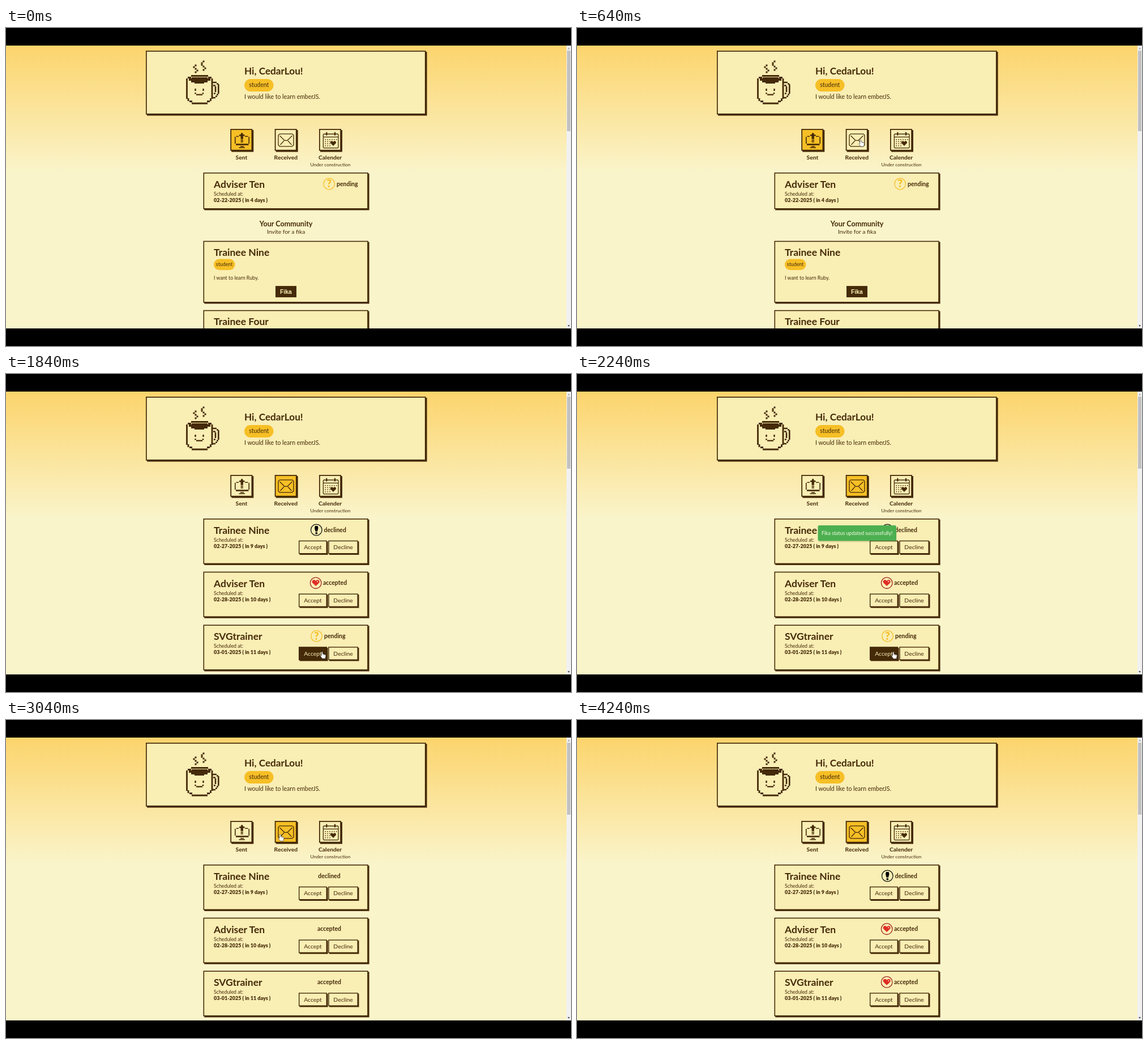
An HTML page that plays this animation: 998x561 px, repeating every 4320 ms.

```html
<!DOCTYPE html>
<html lang="en">
<head>
<meta charset="utf-8">
<title>Fika dashboard</title>
<style>
html, body { margin: 0; width: 100%; height: 100%; overflow: hidden; background: #000; }
svg { display: block; width: 998px; height: 561px; }
text { font-family: Lato, "Open Sans", sans-serif; fill: #452a08; white-space: pre; }
.b { font-weight: 700; }
.x { font-weight: 900; }
.m { text-anchor: middle; }
.fika { font-family: "Liberation Sans", Arial, sans-serif; font-weight: 700; fill: #f9eeb4; }
</style>
</head>
<body>
<svg id="stage" viewBox="0 0 998 561"></svg>
<script>
const INK = '#452a08', CARD = '#f9eeb4', GOLD = '#f6bf26';
const LOOP = 4320, STEP = 80;

const rect = (x, y, w, h, fill, extra = '') =>
  `<rect x="${x}" y="${y}" width="${w}" height="${h}" fill="${fill}" ${extra}/>`;
const text = (x, y, size, str, cls = '', extra = '') =>
  `<text x="${x}" y="${y}" font-size="${size}" class="${cls}" ${extra}>${str}</text>`;
const line = (d, width, extra = '') =>
  `<path d="${d}" fill="none" stroke="${INK}" stroke-width="${width}" ${extra}/>`;
const group = (id, inner, extra = '') => `<g id="${id}" ${extra}>${inner}</g>`;
const at = (x, y, inner) => `<g transform="translate(${x} ${y})">${inner}</g>`;

// Bordered panel with a hard offset shadow
const panel = (x, y, w, h, fill = CARD, edge = 1.6, drop = 1.8, id = '') =>
  rect(x + drop, y + drop, w, h, INK) +
  rect(x + edge / 2, y + edge / 2, w - edge, h - edge, fill,
    `stroke="${INK}" stroke-width="${edge}" ${id && `id="${id}"`}`);

const cup = () => {
  const steam = [[349, 59], [346, 62], [346, 65], [349, 68], [352, 71], [349, 74],
    [335, 66], [332, 69], [335, 72], [338, 75], [335, 78]];
  return steam.map(([x, y]) => rect(x - 1.5, y - 1.5, 3, 3, INK)).join('') +
    line('M327 84.5H357M321 87.5H327M357 87.5H363M319.5 89V125M364 89V125' +
      'M322 124V129M361.5 124V129M324 129.5H329M355 129.5H360M328 133H356', 2.8) +
    `<path d="M323 89H328V87H356V89H361V93H356V96H350V98H333V96H327V93H323Z" fill="${INK}"/>` +
    line('M364 96H372M372 98.5H375M375.3 99V116M372 117.5H375M370 120.5H373M364 123H370' +
      'M366 101.5H370M370 103V113M367 115.5H370', 2.6) +
    line('M334.5 107V111M348.5 107V111M334.5 114V116.5M348 114V116.5M336 117.6H347', 2.4);
};

const heart = (x, y, u, fill) =>
  `<path transform="translate(${x} ${y}) scale(${u})" fill="${fill}" d="M-5-2V-4H-4V-5H-1V-4H1V-5H4V-4H5V-1H4V0H3V1H2V2H1V3H-1V2H-2V1H-3V0H-4V-1H-5Z"/>`;

const monitor = () =>
  line('M411 191.2H406.5M404.8 192V204M422 191.2H427.5M429.2 192V204', 1.6) +
  rect(406, 204.2, 22.5, 2.6, INK) +
  line('M414 209H420M411.5 211H422', 1.7) +
  `<path fill="${INK}" d="M416.7 184.5L418.7 186.5V188H421.5V190.5H418.9V196H414.6V190.5H412V188H414.7V186.5Z"/>` +
  rect(414.6, 197, 4.3, 1.8, INK) + rect(414.6, 199.8, 4.3, 1.8, INK);

const envelope = () =>
  line('M483.5 186.8H505.5L508 189V206.5L505.5 208.8H483.5L481 206.5V189Z', 1.3) +
  line('M483.5 190L492 198.3H497L505.5 190M484.5 206L491 199M504.5 206L498 199', 1.2);

const calendar = () => {
  let dots = '';
  for (let r = 0; r < 4; r++)
    for (let c = 0; c < 6; c++)
      if (r < 1 || c < 3) dots += rect(563.5 + c * 3.9, 196 + r * 3.7, 1.5, 1.5, INK);
  return line('M561.5 187H586L587 188V210.5L586 211.7H561.5L560.4 210.5V188ZM560 192.3H587', 1.3) +
    line('M566.3 183.8V189.5M581 183.8V189.5', 2.2) + dots + heart(578, 204.5, .98, INK);
};

const ring = (color, inner) =>
  `<circle r="9.8" fill="none" stroke="${color}" stroke-width="1.3"/>` + inner;
const marks = {
  pending: ring(GOLD, text(0, 6.2, 18, '?', 'x m', `style="fill:${GOLD}"`)),
  accepted: ring('#9f2822', heart(0, 1, 1.28, '#df2c24') + rect(2, -3.5, 2, 2, '#f6c9ae')),
  declined: ring('#111', `<path d="M-2-7H2L3-5V-2L1.5 3H-1.5L-3-2V-5Z"/>` + rect(-1.7, 4.2, 3.4, 3.2, '#000'))
};

const tab = (x, id, label, icon) =>
  panel(x, 178, 39, 38.6, CARD, 1.8, 2, id) + icon() + text(x + 19.6, 231.6, 10.3, label, 'b m');

const button = (x, y, w, label, id = '') =>
  panel(x, y, w, 23.6, CARD, 1.4, 1.6, id) +
  text(x + w / 2, y + 15.5, 10.4, label, 'm', id && `id="${id}Text"`);

const meeting = (y, h, name, date) =>
  panel(348.5, y, 291.3, h) + text(367, y + 27, 17.5, name, 'b') +
  text(367, y + 40.8, 8.8, 'Scheduled at:') + text(367, y + 52, 9, date, 'x');

// Status label sits in the middle until its mark has loaded
const status = (y, kind, cx, tx) =>
  `<g class="loaded">${at(cx, y + 20, marks[kind])}${text(tx, y + 23.6, 10.5, kind, 'b')}</g>` +
  `<g class="loading">${text(571, y + 23.6, 10.5, kind, 'b m')}</g>`;

const invite = (y, name, date, state, id) =>
  meeting(y, 80.3, name, date) + state +
  button(517, y + 38.8, 50, 'Accept', id) + button(569.3, y + 38.8, 52.6, 'Decline');

const member = (y, name, bio) =>
  panel(348.5, y, 291.3, 109) + text(367, y + 26.8, 17.5, name, 'b') +
  rect(367, y + 32, 37.5, 19.4, GOLD, 'rx="9.7"') + text(385.6, y + 44.5, 8.8, 'student', 'm') +
  text(367, y + 68.2, 8.8, bio) + rect(476, y + 79.5, 37, 20, INK) +
  text(494.5, y + 93, 10.4, 'Fika', 'fika m');

const cursors = {
  arrow: '<path d="M0 0V9.2L2.2 7.2L3.7 10.4L5.2 9.7L3.8 6.6H6.7Z" fill="#fff" stroke="#333" stroke-width=".7"/>',
  hand: '<path d="M-1.2.8Q0-.7 1.1.8V4L6 5.2Q6.7 5.6 6.5 7L5.6 12H.2L-2.8 7.8Q-3.2 6.3-1.2 6.8Z" fill="#fff" stroke="#444" stroke-width=".7"/>' +
    '<path d="M2.7 4.5V6.6M4.4 4.9V6.8" stroke="#777" stroke-width=".5"/>',
  beam: '<path d="M-1.7-4.3H1.7M0-4.3V4.3M-1.7 4.3H1.7" stroke="#333" stroke-width=".8" fill="none"/>'
};

document.getElementById('stage').innerHTML =
  `<defs><linearGradient id="sky" x1="0" y1="0" x2="0" y2="1">
    <stop offset="0" stop-color="#fcd46c"/><stop offset="1" stop-color="#faf4ca"/>
  </linearGradient><clipPath id="view">${rect(0, 31, 998, 499, '#000')}</clipPath></defs>
  <g clip-path="url(#view)">` +
  rect(0, 31, 998, 499, '#faf4ca') + rect(0, 31, 998, 222, 'url(#sky)') +
  panel(247, 40, 494.6, 112.6, CARD, 1.7, 2) + cup() +
  text(421, 82, 17.2, 'Hi, CedarLou!', 'b') +
  rect(421, 90, 51.5, 22, GOLD, 'rx="11"') + text(446.7, 104.4, 10.5, 'student', 'm') +
  text(421, 124.6, 10.5, 'I would like to learn emberJS.') +
  tab(396.3, 'sentTab', 'Sent', monitor) +
  tab(474.7, 'receivedTab', 'Received', envelope) +
  tab(553, 'calendarTab', 'Calender', calendar) +
  text(573, 243.6, 8.4, 'Under construction', 'm') +
  group('sent', meeting(255, 64.6, 'Adviser Ten', '02-22-2025 ( in 4 days )') +
    at(570.7, 275, marks.pending) + text(584, 278.7, 10.5, 'pending', 'b')) +
  group('community', text(494.6, 276.3, 12.6, 'Your Community', 'b m') +
    text(494.6, 290.1, 10.3, 'Invite for a fika', 'm') +
    member(302.3, 'Trainee Nine', 'I want to learn Ruby.') +
    member(424.4, 'Trainee Four', "I'm studying Javascript. And I have 2 years of experience with Ruby.")) +
  group('received',
    invite(255, 'Trainee Nine', '02-27-2025 ( in 9 days )', status(255, 'declined', 548.3, 561.5)) +
    invite(348.7, 'Adviser Ten', '02-28-2025 ( in 10 days )', status(348.7, 'accepted', 547.2, 560)) +
    invite(442.4, 'SVGtrainer', '03-01-2025 ( in 11 days )',
      group('before', status(442.4, 'pending', 548.6, 562)) +
      group('after', status(442.4, 'accepted', 547.2, 560)), 'pick')) +
  group('toast', rect(426, 268.5, 138.5, 28, '#452a08', 'rx="3" opacity=".14"') +
    rect(425.5, 267, 138.5, 27.6, '#4caf50', 'rx="3"') +
    text(494.7, 284, 8.75, 'Fika status updated successfully!', 'm', 'style="fill:#f6fbe6"')) +
  rect(990, 31, 8, 499, '#f1f1f1') + rect(991, 40, 6, 142, '#c1c1c1', 'id="thumb"') +
  `<path d="M994 34.5L996 37.5H992Z" fill="#a3a3a3"/><path d="M994 527L996 524H992Z" fill="#505050"/>` +
  group('cursor', Object.entries(cursors).map(([k, v]) => group(k, v)).join('')) + '</g>';

// time, list shown, scrollbar thumb height
const views = [[0, 'sent', 142], [720, 'received', 127], [2560, '', 148.5], [3040, 'received', 127]];

// time, x, y, cursor shape
const path = [
  [0, 0, 0, ''], [160, 590, 520, 'arrow'], [400, 526, 270, 'arrow'], [480, 503, 203, 'hand'],
  [560, 501, 197, 'hand'], [720, 501, 197, 'hand'], [800, 510, 235, 'arrow'],
  [1120, 543, 373, 'arrow'], [1280, 543, 373, 'arrow'], [1680, 555, 470, 'arrow'],
  [1760, 558.3, 490, 'hand'], [2560, 559, 490.5, 'beam'], [2800, 559, 490.5, 'beam'],
  [2880, 525, 360, 'arrow'], [2960, 488, 208, 'hand'], [3040, 484.3, 201.5, 'hand'],
  [3120, 484.3, 201.5, 'hand'], [3200, 500, 270, 'arrow'], [3360, 530, 518, 'arrow'], [3440, 0, 0, '']
];

const el = id => document.getElementById(id);
const show = (node, on) => { node.style.display = on ? '' : 'none'; };
const between = (t, a, b) => t >= a && t < b;
const last = (table, t) => table.findLastIndex(row => row[0] <= t);

function pose(t) {
  const [, list, thumb] = views[last(views, t)];
  for (const id of ['sent', 'received']) {
    show(el(id), list === id);
    el(id + 'Tab').setAttribute('fill', list === id ? GOLD : CARD);
  }
  show(el('community'), list !== 'received');
  el('community').setAttribute('transform', `translate(0 ${list === 'sent' ? 73.3 : 0})`);
  el('thumb').setAttribute('height', thumb);

  const loading = between(t, 720, 880) || between(t, 3040, 3200);
  document.querySelectorAll('.loading').forEach(n => show(n, loading));
  document.querySelectorAll('.loaded').forEach(n => show(n, !loading));
  show(el('before'), t < 2560);
  show(el('after'), t >= 2560);
  show(el('toast'), between(t, 2080, 2560));

  const hover = between(t, 1760, 2560);
  el('pick').setAttribute('fill', hover ? INK : CARD);
  el('pickText').style.fill = hover ? CARD : INK;

  const i = last(path, t);
  const [t0, x0, y0, kind] = path[i];
  const [t1, x1, y1, next] = path[i + 1] || path[i];
  const k = next && t1 > t0 ? (t - t0) / (t1 - t0) : 0;
  for (const id in cursors) show(el(id), id === kind);
  el('cursor').setAttribute('transform', `translate(${x0 + (x1 - x0) * k} ${y0 + (y1 - y0) * k})`);
}

function tick() {
  const t = performance.now() % LOOP;
  pose(Math.floor(t / STEP) * STEP);
  requestAnimationFrame(tick);
}
tick();
</script>
</body>
</html>
```
